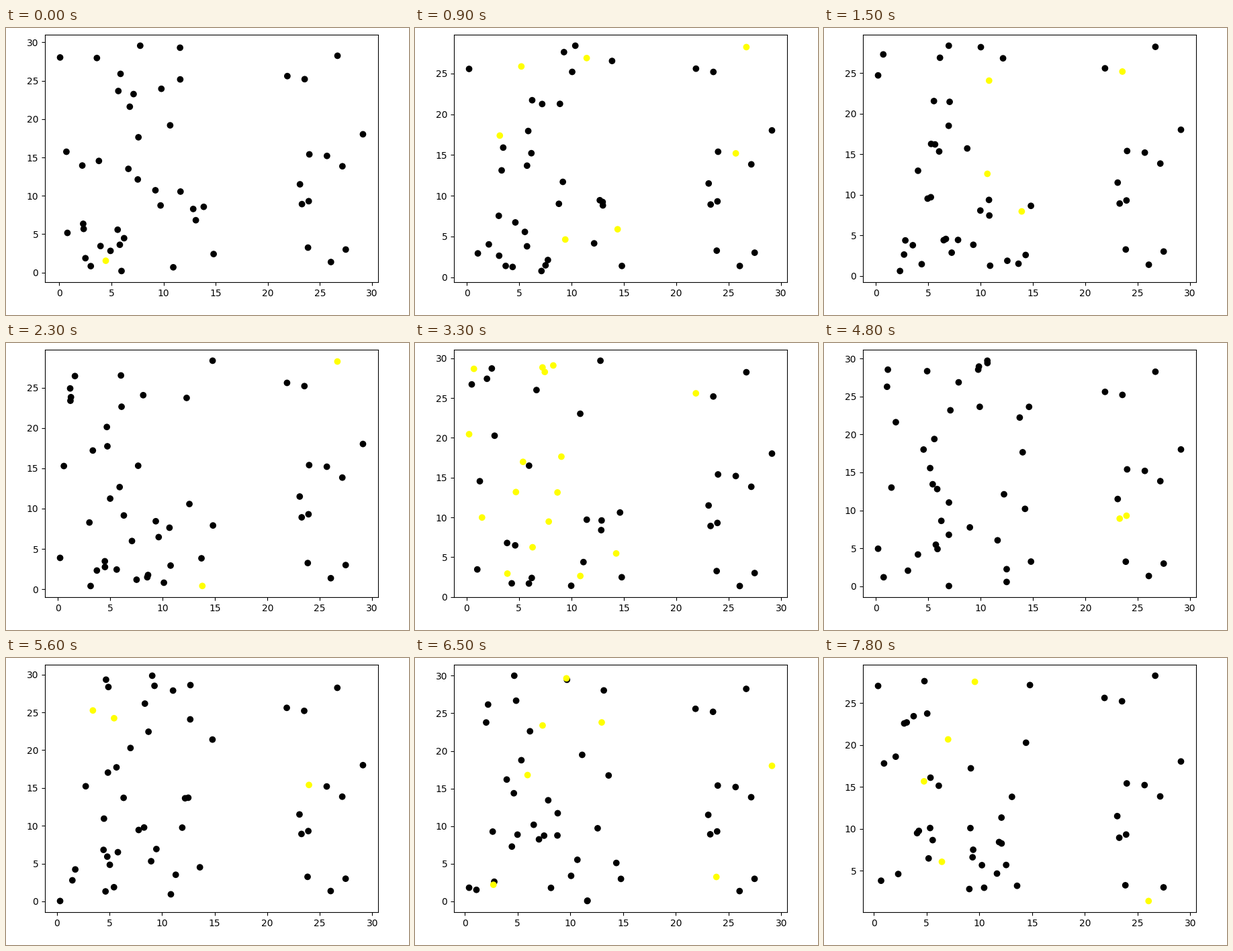
A matplotlib script for the animation above (8 s loop, 600 by 428 pixels).

```python
import numpy as np
import matplotlib.pyplot as plt
from matplotlib.animation import FuncAnimation

W, H, DPI = 600, 428, 100
TICK, FRAMES = 100, 80       # ms per drawn frame, frames per loop
STEP = 147                   # ms between moves of the swarm
STATES = FRAMES * TICK // STEP
SWARM = 37
WIDTH, HEIGHT = 15.0, 30.0   # field of the swarm

# resting fireflies: x, y, first flash, states between flashes
RESTING = np.array([
    (26.68, 28.25, 6, 9), (21.87, 25.60, 4, 9), (23.53, 25.20, 1, 9),
    (29.12, 18.02, 4, 10), (23.98, 15.40, 2, 9), (25.67, 15.20, 6, 10),
    (27.15, 13.85, 3, 9), (23.08, 11.50, 7, 9), (23.27, 8.92, 5, 9),
    (23.92, 9.30, 5, 9), (23.85, 3.25, 4, 8), (27.47, 3.00, 1, 10),
    (26.05, 1.37, 3, 10),
])
REST_XY, FIRST, PERIOD = RESTING[:, :2], RESTING[:, 2], RESTING[:, 3]

# how the swarm spreads and glows: state, left, bottom, top, number lit
KEYS = np.array([
    (0, 0.08, 0.20, 29.56, 1), (6, 0.22, 0.75, 28.42, 5),
    (15, 0.20, 0.40, 28.35, 1), (22, 0.25, 1.40, 29.70, 15),
    (32, 0.20, 0.05, 29.70, 0), (44, 0.40, 0.05, 30.00, 5),
    (53, 0.40, 2.80, 27.60, 4),
])
LEFT, BOTTOM, TOP, COUNT = (
    np.interp(range(STATES), KEYS[:, 0], col) for col in KEYS[:, 1:].T)


def spread(v, low, high):
    """Stretch each state's values so that they run from low to high."""
    least = v.min(axis=1, keepdims=True)
    span = np.ptp(v, axis=1, keepdims=True)
    low, high = np.reshape(low, (-1, 1)), np.reshape(high, (-1, 1))
    return low + (v - least) / span * (high - low)


def wander(rng):
    """Unit steps in random directions on a field that wraps around."""
    angle = rng.uniform(0, 2 * np.pi, (STATES, SWARM))
    x = rng.uniform(0, WIDTH, SWARM) + np.cos(angle).cumsum(axis=0)
    y = rng.uniform(0, HEIGHT, SWARM) + np.sin(angle).cumsum(axis=0)
    x = spread(x % WIDTH, LEFT, WIDTH - 0.2)
    y = spread(y % HEIGHT, BOTTOM, TOP)
    return np.stack([x, y], axis=-1)


def flashes(rng):
    """Light the wanted number of wanderers in each state."""
    rank = rng.random((STATES, SWARM)).argsort(axis=1)
    return rank < COUNT.round()[:, None]


rng = np.random.default_rng(12)
paths = wander(rng)
lit = flashes(rng)

fig = plt.figure(figsize=(W / DPI, H / DPI), dpi=DPI, facecolor="white")
ax = fig.add_axes([58 / W, 48.8 / H, 496 / W, 369.6 / H])
dots = ax.scatter(*np.vstack([paths[0], REST_XY]).T, c="black")


def padded(v):
    pad = 0.05 * np.ptp(v)
    return v.min() - pad, v.max() + pad


def draw(frame):
    k = min(frame * TICK // STEP, STATES - 1)
    xy = np.vstack([paths[k], REST_XY])
    rest_lit = (k >= FIRST) & ((k - FIRST) % PERIOD == 0)
    glow = np.concatenate([lit[k], rest_lit])
    dots.set_offsets(xy)
    dots.set_color(np.where(glow, "yellow", "black"))
    ax.set_xlim(padded(xy[:, 0]))
    ax.set_ylim(padded(xy[:, 1]))
    return dots,


anim = FuncAnimation(fig, draw, frames=FRAMES, interval=TICK,
                     repeat=True, repeat_delay=0, blit=False)
plt.show()
```
